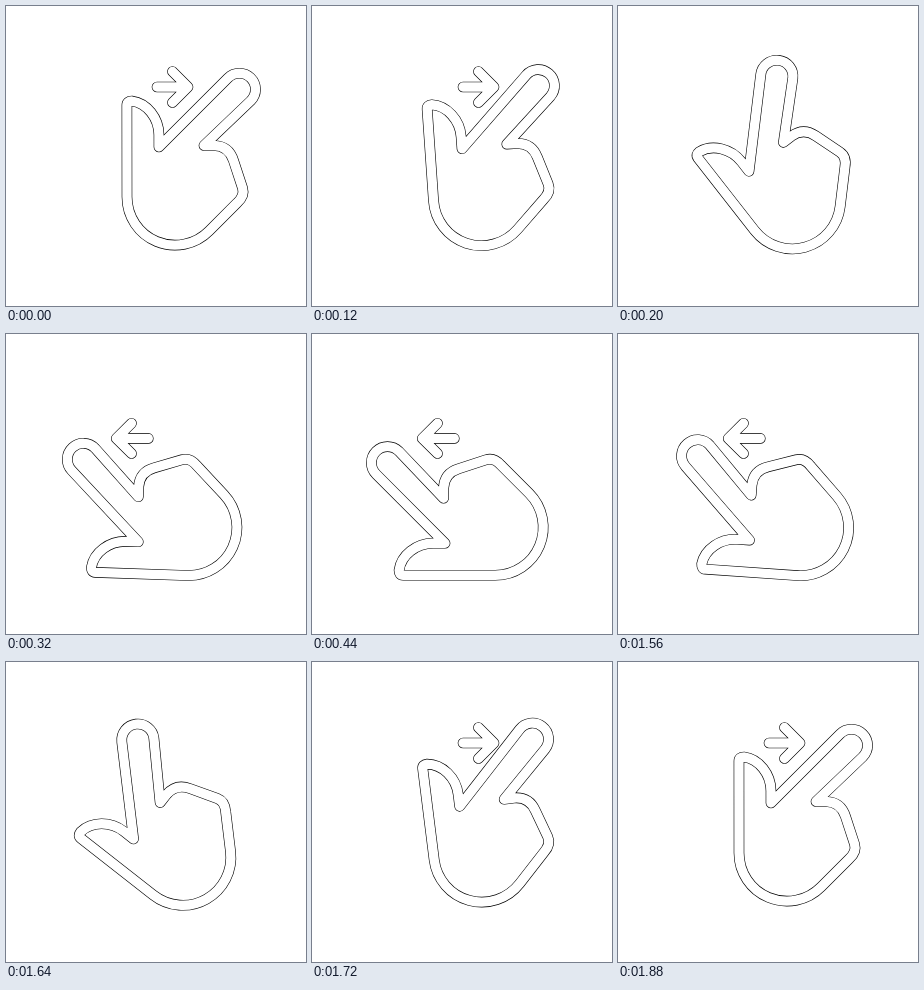
Animation of 300x300 px, one loop 2880 ms. Source, as an HTML page:

```html
<!DOCTYPE html>
<html lang="en">
<head>
<meta charset="utf-8">
<title>Swipe gesture</title>
<style>
  html, body { margin: 0; height: 100%; overflow: hidden; background: #fff; }
  svg { display: block; width: 100%; height: 100%; }
  path { fill: none; stroke-linecap: round; stroke-linejoin: round; }
  .edge { stroke: #000; stroke-width: 10.6; }
  .core { stroke: #fff; stroke-width: 9.4; }
</style>
</head>
<body>
<svg viewBox="0 0 300 300">
  <g id="left"></g>
  <g id="right"></g>
  <g id="hand"></g>
</svg>
<script>
const LOOP = 2880, HALF = LOOP / 2, STEP = 40;
const PIVOT = "177.2 185.1";
const shapes = {
  left: "M142.3 104.4H110.3L125.5 89.3M110.3 104.4L125.5 119.5",
  right: "M151 81H182L166.5 65.5M182 81L166.5 96.5",
  hand: `M121 99V191A48 48 0 0 0 203 225L231 197Q239 190 236.5 182
    L227.5 154.5Q223 140 208 139.5H198L244.9 94.8
    A16 16 0 0 0 222.1 72L153 141V129C153 112 141 97 126 95Q121 95 121 99Z`
};
const parts = {};

// Each shape is a white band with a thin dark edge.
for (const [id, d] of Object.entries(shapes)) {
  parts[id] = document.getElementById(id);
  parts[id].innerHTML = `<path class="edge" d="${d}"/><path class="core" d="${d}"/>`;
}

const ease = ms => 1 / (1 + Math.exp((209 - ms) * 0.0345));
const show = (part, on) => part.setAttribute("visibility", on ? "visible" : "hidden");

function draw(now) {
  const t = Math.floor(now % LOOP / STEP) * STEP;
  const turn = t < HALF ? ease(t) : 1 - ease(t - HALF);
  parts.hand.setAttribute("transform", `rotate(${-90 * turn} ${PIVOT})`);
  show(parts.left, turn > 0.88);
  show(parts.right, turn < 0.12);
  requestAnimationFrame(draw);
}
draw(performance.now());
</script>
</body>
</html>
```
